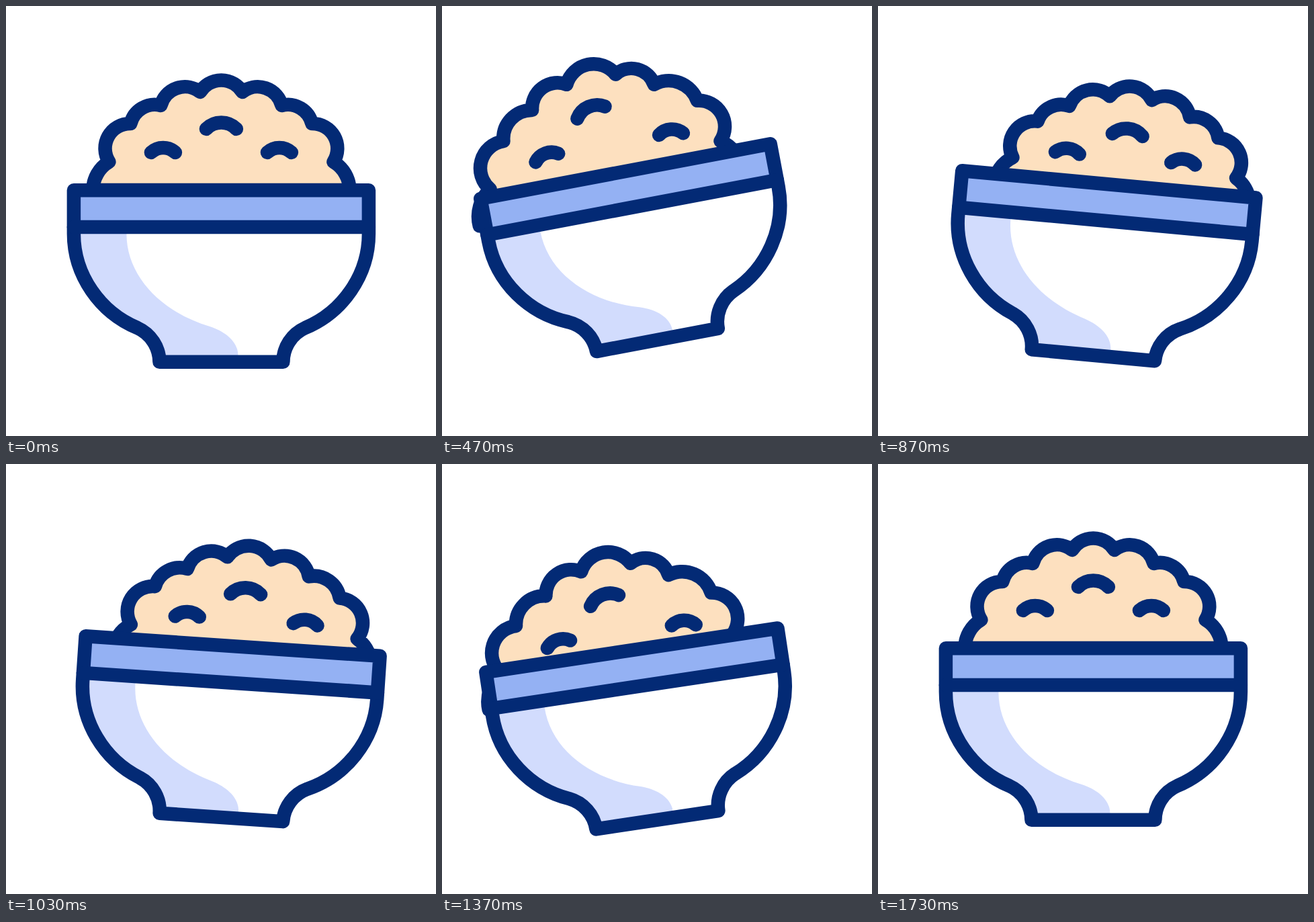
These frames come from a looping animation (640 px wide and 640 px high, 2000 ms). An HTML page:

```html
<!DOCTYPE html>
<html lang="en">
<head>
<meta charset="utf-8">
<title>Rice bowl</title>
<style>
  html, body { margin: 0; width: 100%; height: 100%; overflow: hidden; background: #fff; }
  svg { display: block; width: 100vw; height: 100vh; }
  .line { fill: none; stroke: #032a75; stroke-width: 20.5; stroke-linecap: round; stroke-linejoin: round; }
  #mound { fill: #fde0bf; }
</style>
</head>
<body>
<svg viewBox="0 0 640 640">
  <g id="all">
    <g id="rice">
      <path id="mound" class="line"/>
      <path class="line grain"/>
      <path class="line grain"/>
      <path class="line grain"/>
    </g>
    <path id="body" fill="#fff"/>
    <path id="shade" fill="#d2dcfd"/>
    <path fill="#94b1f3" d="M100.5 274.3H539.5V329H100.5Z"/>
    <path id="edge" class="line"/>
    <path class="line" d="M100.5 329H539.5"/>
  </g>
</svg>
<script>
const LOOP = 2000, FPS = 30, MID = 320;
const $ = id => document.getElementById(id);
const move = (el, value) => el.setAttribute('transform', value);

// Bowl
const left = 'C100.5 401 140 456 195 479C215 488 228 508 228 529.75';
const right = 'H412C412 508 425 488 445 479C500 456 539.5 401 539.5 339V274.3Z';
const bowl = 'M100.5 274.3V339' + left + right;
$('body').setAttribute('d', bowl);
$('edge').setAttribute('d', bowl);
$('shade').setAttribute('d', 'M100.5 329V339' + left +
  'H345V520C345 500 327 485 303 477C232 456 179 403 179 339V329Z');

// Notches of the mound, left half mirrored to the right
const half = [[191, 274], [167, 232], [135, 175], [90, 148], [31.5, 128]];
const notches = [
  ...half.map(([x, y]) => [MID - x, y]),
  ...half.map(([x, y]) => [MID + x, y]).reverse()
];

// Grains: centre, half width, arc radius, shift and turn when the mound bulges
const grains = [
  { x: 233.5, y: 218, w: 18, r: 26.5, dx: 0, dy: 4.5, turn: -10 },
  { x: 320, y: 183, w: 22.5, r: 31.5, dx: -9.5, dy: -14.5, turn: -13 },
  { x: 406.5, y: 218, w: 18, r: 26.5, dx: 15, dy: 4, turn: 6.5 }
];
const grainEls = document.querySelectorAll('.grain');
grains.forEach(({ x, y, w, r }, i) =>
  grainEls[i].setAttribute('d', `M${x - w} ${y}a${r} ${r} 0 0 1 ${2 * w} 0`));

// Bulging lifts the crown, drops the flanks and widens every other bump
function warp([x, y], m) {
  const u = (x - MID) / 190;
  const dx = 12 * u - 1 + 4 * (1 + u) * Math.sin(11.5 * u);
  const dy = 34 * u * u - 4 * u - 9;
  return [x + dx * m, y + dy * m];
}

const dist = (a, b) => Math.hypot(a[0] - b[0], a[1] - b[1]);

function moundPath(m) {
  const pts = notches.map(n => warp(n, m));
  return pts.map((p, i) => {
    if (!i) return 'M' + p;
    const stretch = dist(p, pts[i - 1]) / dist(notches[i], notches[i - 1]);
    const base = i === 1 || i === pts.length - 1 ? 48.75 : 37;
    const r = base * stretch ** 0.75;
    return `A${r} ${r} 0 0 1 ${p}`;
  }).join('') + 'Z';
}

function draw(f) {
  const part = (a, b) => Math.min(1, Math.max(0, (f - a) / (b - a)));
  const ease = (a, b) => part(a, b) ** 2 * (3 - 2 * part(a, b));
  const hop = (a, b, height) => height * Math.sin(Math.PI * part(a, b)) ** 2;

  const lift = hop(0, 20, 50) + hop(20, 28, 20) + hop(28, 40, 7.6);
  const tilt = -10.7 * ease(0, 14) + 16.9 * ease(14, 28) - 15 * ease(28, 40) + 8.8 * ease(40, 50);
  const slide = -28.6 * ease(0, 11) + 51.1 * ease(11, 28) - 42.5 * ease(28, 40) + 20 * ease(40, 50);
  const sink = 30 * ease(0, 7) - 19.5 * ease(7, 14) + 5.5 * ease(20, 27) +
    12.5 * ease(31, 41) - 28.5 * ease(40, 47);
  const bulge = ease(0, 14) - ease(16, 26) + ease(28, 38) - ease(41, 52);

  move($('all'), `translate(0.4 ${-lift}) rotate(${tilt} ${MID} 529.75)`);
  move($('rice'), `translate(${slide} ${sink})`);
  $('mound').setAttribute('d', moundPath(bulge));
  grains.forEach(({ x, y, dx, dy, turn }, i) => move(grainEls[i],
    `translate(${dx * bulge} ${dy * bulge}) rotate(${turn * bulge} ${x} ${y})`));
}

const start = performance.now();
function tick() {
  const t = (performance.now() - start) % LOOP;
  draw(Math.floor((t + 4) * FPS / 1000));
  requestAnimationFrame(tick);
}
tick();
</script>
</body>
</html>
```
